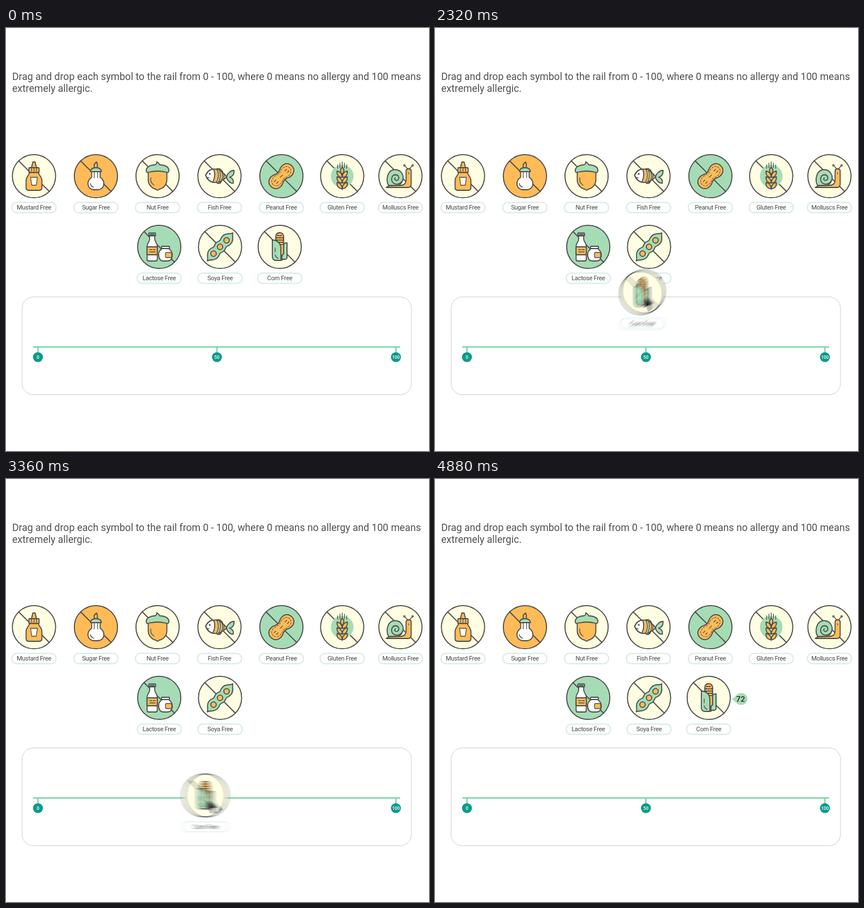
Animation of 748 by 748 pixels, one loop 4920 ms. Source, as an HTML page:

```html
<!DOCTYPE html>
<html lang="en">
<head>
<meta charset="utf-8">
<title>Allergy rail</title>
<style>
html, body { margin: 0; width: 100%; height: 100%; overflow: hidden; background: #fff; }
svg { display: block; width: 100%; height: 100%; }
.intro { font: 17.63px Roboto, sans-serif; fill: #505050; }
.label { font: 11px Roboto, sans-serif; letter-spacing: -.32px; fill: #484848; text-anchor: middle; }
.badge { font: 600 8px "Open Sans", sans-serif; fill: #fff; text-anchor: middle; }
.value { font: 600 13px Inter, sans-serif; fill: #333; text-anchor: middle; }
.art { stroke: #4d4d4d; stroke-width: 1.8; stroke-linejoin: round; stroke-linecap: round; fill: none; }
.o { fill: #ffbb57; } .g { fill: #a5dcb5; } .c { fill: #fffde2; } .w { fill: #fff; }
.thin { stroke-width: 1.3; }
#moving { isolation: isolate; }
#moving use { mix-blend-mode: plus-lighter; }
</style>
</head>
<body>
<svg viewBox="0 0 748 748">
  <defs id="defs">
    <path id="route" d="M484 387L249 548Q232 559.5 184 559.5"/>
  </defs>
  <rect width="748" height="748" fill="#fff"/>
  <text class="intro" x="11" y="92">Drag and drop each symbol to the rail from 0 - 100, where 0 means no allergy and 100 means</text>
  <text class="intro" x="11" y="112.5">extremely allergic.</text>
  <rect x="28.5" y="475.5" width="688.5" height="173" rx="20" fill="#fff" stroke="#cdcdcd"/>
  <path d="M48 564H697M56.5 564v10M373 564v10M689.5 564v10" stroke="#7ad6a3" stroke-width="2.4" fill="none"/>
  <g id="badges"></g>
  <g id="icons"></g>
  <g id="reading">
    <path d="M496.5 505.5v15" stroke="#a5dcb5" stroke-width="2.6"/>
    <text class="value" x="496.3" y="502">72</text>
  </g>
  <g id="moving"></g>
  <g id="bubble">
    <path d="M524.5 389.5C531 387 533 378.5 542 378.5A10.5 10.5 0 0 1 542 399.5C533 399.5 531 392 524.5 389.5Z" fill="#a2dcb5"/>
    <text class="value" x="540.5" y="394">72</text>
  </g>
</svg>
<script>
const $ = id => document.getElementById(id);
const path = (cls, d) => `<path class="${cls}" d="${d}"/>`;
const rect = (cls, x, y, w, h, r = 1) => `<rect class="${cls}" x="${x}" y="${y}" width="${w}" height="${h}" rx="${r}"/>`;
const circle = (cls, x, y, r) => `<circle class="${cls}" cx="${x}" cy="${y}" r="${r}"/>`;
const turned = (angle, content) => `<g transform="rotate(${angle})">${content}</g>`;

const nutShell = "M-26 0C-26-9-19-12.500-12-12C-6-11.500-5-8.500 0-8.500C5-8.500 6-11.500 12-12C19-12.500 26-9 26 0C26 9 19 12.500 12 12C6 11.500 5 8.500 0 8.500C-5 8.500-6 11.500-12 12C-19 12.500-26 9-26 0Z";

const ear = y => path("o", `M0 ${y + 9}C-7 ${y + 9}-10 ${y + 4}-9 ${y - 2}C-4 ${y - 1} 0 ${y + 3} 0 ${y + 9}ZM0 ${y + 9}C7 ${y + 9} 10 ${y + 4} 9 ${y - 2}C4 ${y - 1} 0 ${y + 3} 0 ${y + 9}Z`);

const art = {
  mustard: path("o", "M-4.500-15L-2-25H2L4.500-15Z") + rect("o", -9, -15, 18, 8.5) + path("thin", "M-4.500-14v5M0-14v5M4.500-14v5") +
    path("o", "M-8-6.500C-8-2-14 1-14 8V20Q-14 25-9 25H9Q14 25 14 20V8C14 1 8-2 8-6.500Z") +
    path("c thin", "M-6 2H6L4 16H-4Z"),
  sugar: path("o", "M-3-14V-21L1-25L2.500-22V-14Z") +
    path("w", "M-7.500-8V2C-12 5-14 8-14 13C-14 20-9 24-3 24H3C9 24 14 20 14 13C14 8 12 5 7.500 2V-8Z") +
    path("thin", "M-3-7V3M3-7V3M-10 13q1 5 6 6.500") +
    path("g", "M-9.500-8Q-9.500-15 0-15Q9.500-15 9.500-8Z"),
  nut: path("o", "M-16.500-9V6C-16.500 16-9 22-3 23Q0 26.500 3 23C9 22 16.500 16 16.500 6V-9Z") + path("thin", "M-12 3v4c0 4 3 7 6 9") +
    path("g", "M-20-10C-20-16-13-20-5-20Q-1-21-1.500-25.500Q2-24 4-20C14-19.500 20-16 20-10Q20-5.500 15.500-7Q0-11-15.500-7Q-20-5.500-20-10Z"),
  fish: turned(4,
    path("o", "M-8-11C-4-14.500 1-14 5-8ZM-5 11C-2 14 2 14 4 9Z") +
    path("g", "M12 0C15-7 19-11.500 25-12C26-5 23-1 18 0.500C23 2 26 5 25 11C19 11 15 7 12 1Z") +
    path("o", "M-24.500 0C-19-16-1-16 13 0.500C-1 16-19 15-24.500 0Z") +
    path("g thin", "M-5-11.500Q1 0-5 11.500L-1 11Q4 0-1-11ZM4-7Q7 0 4 7.500L7 5.500Q9 0 7-5Z") +
    path("w", "M-24.500 0C-21-8-16-11.500-11-11.500Q-6 0-11 11.500C-17 10.500-21 7-24.500 0Z") +
    circle("thin", -17.5, -3, 1) + path("thin", "M-22 4h4")),
  peanut: turned(-45, path("o", nutShell) +
    `<g transform="scale(.8 .7)" stroke-dasharray="4 3">${path("thin", nutShell)}</g>` +
    path("thin", "M-16-2h4M-15 3h4M-3 0h6M11-2h4M12 3h4")),
  gluten: `<circle r="20" fill="#a5dcb5" stroke="none"/>` +
    path("thin", "M0-25v10M-4-23v8M4-23v8M-8-20v6M8-20v6M0 20v4") +
    ear(13) + ear(3) + ear(-7) + path("o", "M0-16Q-6-10 0-3Q6-10 0-16Z"),
  snail: path("o", "M-25 20C-21 16-12 16.500-2 16.500C7 16.500 10 13 10 5V-9Q10-13 14.500-13Q19-13 19-9V14Q19 20 13 20Z") +
    path("thin", "M13-13L8-18M16-13L20.500-18M14.500-6v2") + circle("o thin", 7, -19, 1.4) + circle("o thin", 21.5, -19, 1.4) +
    path("g", "M-21 16.500C-26 8-24-11-10-11.500C1-12 7-1 4 7Q1 16.500-7 16.500Z") +
    path("", "M4 7C2 13-7 16-12 12.500C-18 8-16-2-9-2.500C-3-2.500-1 4-5 7C-9 9-12 5-9 3"),
  milk: path("w", "M-17-20V-14C-17-8-21.500-8-21.500-1V22Q-21.500 25-18.500 25H-6.500Q-3.500 25-3.500 22V-1C-3.500-8-8-8-8-14V-20Z") +
    rect("", -18.5, -24.5, 12, 5) + path("thin", "M-16-22h7") +
    rect("o", -21.5, 0, 18, 14, 0) + path("thin", "M-17 5h4M-11 5h4M-17 9h10") +
    path("w", "M5 3C0 7-1 9-1 14C-1 21 2 25 8 25H14C20 25 23 21 23 14C23 9 21 7 17 3Z") +
    rect("w", 4, -1, 14, 4) + rect("o thin", 11, 10, 11, 9, 2),
  soya: turned(-46, path("g", "M-33.500 1C-28-1-26-10-17-10C-11-10-10-8-8-8C-5-8-4-10 0-10C4-10 5-8 8-8C10-8 11-10 17-10C26-10 28-2 33.500-1C28 2 26 10 17 10C11 10 10 8 8 8C5 8 4 10 0 10C-4 10-5 8-8 8C-10 8-11 10-17 10C-26 10-28 2-33.500 1Z")) +
    circle("o", -11.5, 12, 4.8) + circle("o", 0, 0, 4.8) + circle("o", 11.5, -11.5, 4.8),
  corn: path("g", "M4 24V-1Q6-7 13-7V18Q13 22 9 22H4Z") +
    path("o", "M-7 8V-17C-7-23-4-25 0-25C4-25 7-23 7-17V12L3 16Z") +
    `<g stroke-dasharray="2.5 2">${path("", "M-4-20H5M-5.500-16H6M-5.500-12H6M-5.500-8H6M0-4H6")}</g>` +
    path("g", "M-13-12C-4-12 2-6 2 3V24H-6Q-13 24-13 17Z") + path("thin", "M-8 2V9M-8 14Q-7 19-3 20")
};

const cream = "#fffde2", orange = "#ffbb57", green = "#a5dcb5";
const icons = [
  ["mustard", "Mustard Free", 49.5, 262, cream],
  ["sugar", "Sugar Free", 159, 262, orange],
  ["nut", "Nut Free", 268, 262, cream],
  ["fish", "Fish Free", 377.5, 262, cream],
  ["peanut", "Peanut Free", 487, 262, green],
  ["gluten", "Gluten Free", 594.5, 262, cream],
  ["snail", "Molluscs Free", 697.5, 262, cream],
  ["milk", "Lactose Free", 271, 387, green],
  ["soya", "Soya Free", 378.5, 387, cream],
  ["corn", "Corn Free", 484, 387, cream]
];

const symbol = ([name, label, , , fill]) => `<g id="${name}">
  <g class="art"><circle r="38.2" fill="${fill}"/><path d="M-27-27L27 27"/>${art[name]}</g>
  <rect x="-39" y="46.5" width="78" height="18" rx="8" fill="#fff" stroke="#e9f5f2" stroke-width="3"/>
  <rect x="-38.5" y="46.8" width="77" height="17.4" rx="8" fill="#fff" stroke="#c8e4dd"/>
  <text class="label" y="59.4">${label}</text></g>`;

$("defs").innerHTML += icons.map(symbol).join("") +
  `<path id="cursor" d="M4 6V28.500L9 24L13 33L17 31.200L13.200 22.500H20Z" fill="#111" stroke="#fff" stroke-width="1.2"/>
   <g id="held"><use href="#corn"/><use href="#cursor"/></g>`;
$("icons").innerHTML = icons.slice(0, -1)
  .map(([name, , x, y]) => `<use href="#${name}" x="${x}" y="${y}"/>`).join("");
$("badges").innerHTML = [[56.5, 0], [373, 50], [689.5, 100]]
  .map(([x, n]) => `<circle cx="${x}" cy="582" r="8.8" fill="#0b9b8b"/><text class="badge" x="${x}" y="585">${n}</text>`).join("");

const LOOP = 4920, STEP = 40, SHUTTER = 20, COPIES = 10;
$("moving").innerHTML = '<use href="#corn"/>'.repeat(COPIES);
const copies = [...$("moving").children];
const route = $("route"), routeLength = route.getTotalLength();
const ramp = (t, a, b) => Math.min(1, Math.max(0, (t - a) / (b - a)));

// Bezier easing with flat ends; x1 and x2 are the handle times.
function ease(p, x1, x2) {
  let lo = 0, hi = 1;
  for (let i = 0; i < 24; i++) {
    const u = (lo + hi) / 2, v = 1 - u;
    if (3 * u * v * v * x1 + 3 * u * u * v * x2 + u * u * u < p) lo = u; else hi = u;
  }
  return lo * lo * (3 - 2 * lo);
}

function place(t) {
  if (t < 2000 || t >= 4380) return { x: 484, y: 387 };
  if (t < 3040) return route.getPointAtLength(routeLength * ease(ramp(t, 2000, 2840), .16, .72));
  return { x: 184 + 309.5 * ease(ramp(t, 3040, 3880), .3, .32), y: 559.5 };
}

function draw(t) {
  const a = place(t - SHUTTER / 2), b = place(t + SHUTTER / 2);
  const blurred = t > 2000 && t < 3880 && Math.hypot(b.x - a.x, b.y - a.y) > .6;
  const held = t >= 2000 && t < 4380;
  const leave = 1 - ramp(t, 3960, 4320), arrive = ramp(t, 4400, 4840);

  copies.forEach((copy, i) => {
    const p = blurred ? place(t + SHUTTER * ((i + .5) / COPIES - .5)) : place(t);
    copy.setAttribute("href", held ? "#held" : "#corn");
    copy.setAttribute("transform", `translate(${p.x} ${p.y})`);
    copy.setAttribute("opacity", blurred ? 1 / COPIES : i ? 0 : 1);
  });
  $("moving").setAttribute("opacity", t < 2000 ? 1 : held ? leave : arrive);
  if (t < 2000) $("bubble").setAttribute("opacity", 0);
  else $("bubble").setAttribute("opacity", arrive);
  $("reading").setAttribute("opacity", ramp(t, 3720, 3880) * leave);
}

const start = performance.now();
function tick() {
  const t = (performance.now() - start) % LOOP;
  draw(Math.floor(t / STEP) * STEP);
  requestAnimationFrame(tick);
}
tick();
</script>
</body>
</html>
```
